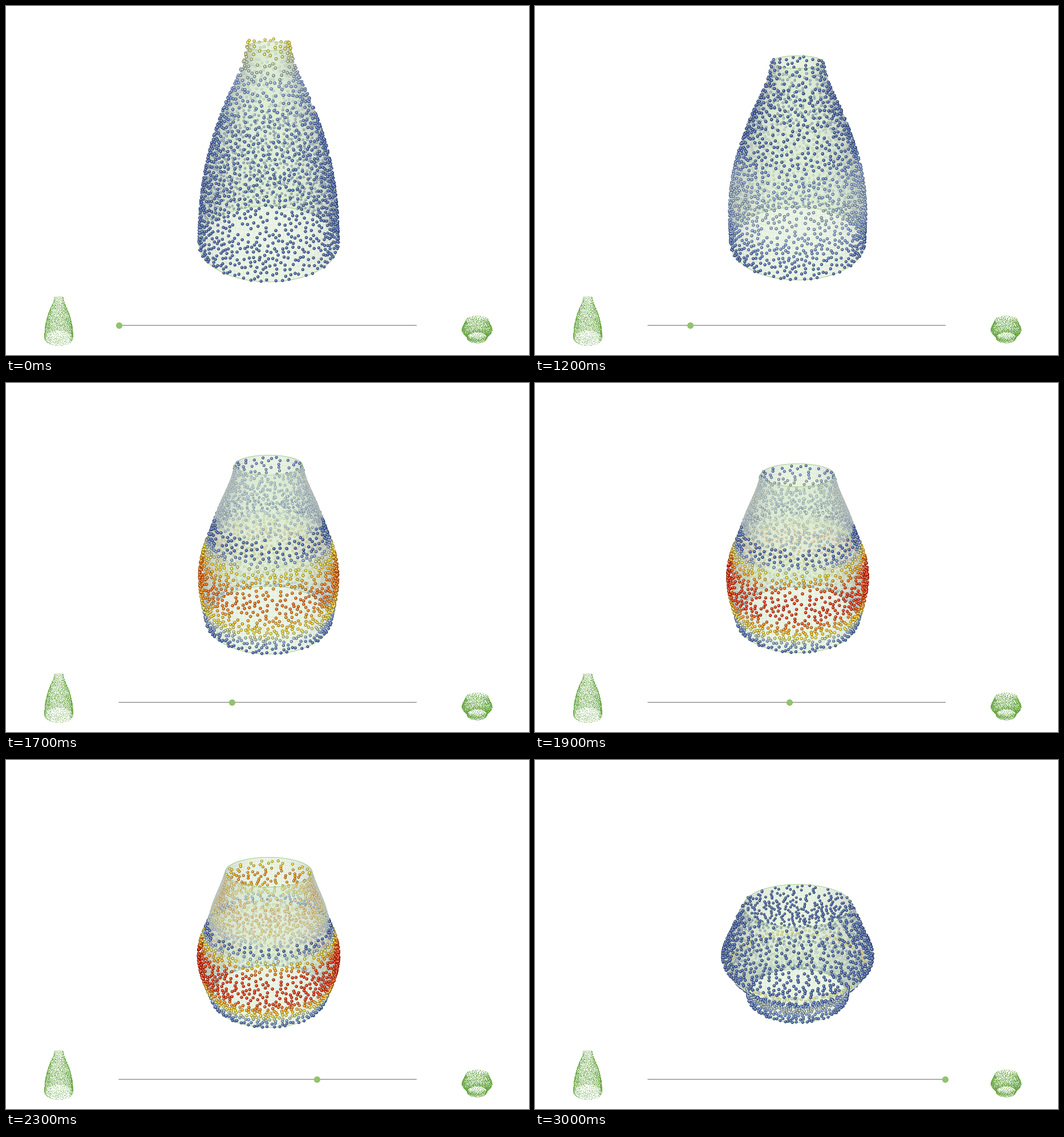
A matplotlib script that plays this animation: 917 px wide and 611 px high, repeating every 4000 ms.

```python
import matplotlib.pyplot as plt
import numpy as np
from matplotlib.animation import FuncAnimation
from matplotlib.collections import PolyCollection

W, H, DPI = 917, 611, 100
STEPS, HOLD, FRAMES = 21, 10, 40
CX, CY, DIST = 460.5, 265, 984
SIN, COS = np.sin(np.radians(24)), np.cos(np.radians(24))
BASE, TALL, SHORT = -168.6, 364.7, 182.6
COUNT = 2100

BOTTLE = ([0, .23, .536, .708, .923, 1], [130, 122.5, 98.5, 75.5, 40, 33])
BOWL = ([0, .12, .25, .36, .46, .6, .8, 1],
        [95, 104, 113, 118.5, 120, 118, 110, 94])

KEYS = np.array([0, 1, 6, 10, 14, 17, 21]) / STEPS
BULGE = [0, .3, 5.2, 8.8, 9.4, 7.8, 0]
SINK = [0, 0, -1.8, -3, -6, -6, 0]
LIFT = [7, 2.5, -2, -1, -4, -5, -.5]

RAMP_X = [0, 1, 2.4, 3.4, 4.3, 5.6, 6.8, 8.4]
RAMP = np.array([[66, 97, 172], [82, 116, 190], [140, 170, 224],
                 [205, 212, 150], [246, 228, 45], [250, 190, 25],
                 [248, 135, 15], [236, 48, 10]]) / 255
LEAF = np.array([215, 233, 204]) / 255
SHADE = np.array([186, 194, 186]) / 255
GREEN = "#92c36d"
LINE_Y = 559.1


def spline(x, knots):
    """Cubic Hermite curve through a few knots."""
    xs, ys = map(np.asarray, knots)
    slope = np.gradient(ys, xs)
    i = np.clip(np.searchsorted(xs, x) - 1, 0, len(xs) - 2)
    h = xs[i + 1] - xs[i]
    u = (x - xs[i]) / h
    return ((1 + 2 * u) * (1 - u) ** 2 * ys[i] + u * (1 - u) ** 2 * h * slope[i]
            + u * u * (3 - 2 * u) * ys[i + 1] + u * u * (u - 1) * h * slope[i + 1])


def bump(s, mid, width):
    return np.exp(-((s - mid) / width) ** 2)


def late(t):
    return np.clip((t - .75) / .25, 0, 1)


def radius(s, t):
    """Blend of both profiles; belly and neck form near the end."""
    blend = (1 - t) * spline(s, BOTTLE) + t * spline(s, BOWL)
    return blend + late(t) * (15 * bump(s, .48, .2) - 14 * bump(s, .16, .12))


def height(t):
    return TALL + (SHORT - TALL) * t


def project(x, y, z):
    scale = DIST / (DIST + y * COS - z * SIN)
    xy = np.stack([CX + x * scale, CY - (z * COS + y * SIN) * scale], -1)
    return xy, scale


def facing(theta, s, t, r, z):
    """Positive where the outside of the wall looks at the camera."""
    lo, hi = np.maximum(s - .004, 0), np.minimum(s + .004, 1)
    slope = (radius(hi, t) - radius(lo, t)) / ((hi - lo) * height(t))
    x, y = r * np.cos(theta), r * np.sin(theta)
    to_cam = -x, -DIST * COS - y, DIST * SIN - z
    return (np.cos(theta) * to_cam[0] + np.sin(theta) * to_cam[1]
            - slope * to_cam[2])


def scatter_points(rng):
    """Best-candidate sampling, even over the area of the tall shape."""
    grid = np.linspace(0, 1, 400)
    cdf = np.cumsum(radius(grid, 0))
    cdf = (cdf - cdf[0]) / (cdf[-1] - cdf[0])
    pts, params = np.zeros((COUNT, 3)), np.zeros((COUNT, 2))
    for i in range(COUNT):
        s = np.interp(rng.random(6), cdf, grid)
        th = rng.random(6) * 2 * np.pi
        r = radius(s, 0)
        cand = np.stack([r * np.cos(th), r * np.sin(th), s * TALL], -1)
        best = 0
        if i:
            gap = ((cand[:, None] - pts[None, :i]) ** 2).sum(-1)
            best = gap.min(1).argmax()
        pts[i], params[i] = cand[best], (s[best], th[best])
    return params.T


def dot_state(t):
    """Screen places, scale, signed gap to the wall and facing of all dots."""
    bulge, sink, lift = (np.interp(t, KEYS, v) for v in (BULGE, SINK, LIFT))
    low = np.sin(np.pi * np.clip(S / .6, 0, 1) ** 1.2)
    high = np.sin(np.pi * .88 * np.clip((S - .6) / .4, 0, 1))
    pinch = 2.6 * bump(S, .15, .09) - 6 * bump(S, .365, .035)
    gap = .4 + bulge * low + sink * high + late(t) * pinch
    rise = lift * S ** 4
    r = radius(S, t) + gap
    z = BASE + S * height(t) + rise
    xy, scale = project(r * np.cos(TH), r * np.sin(TH), z)
    return xy, scale, gap + .55 * rise, facing(TH, S, t, r, z) > 0


def wall_state(t):
    """Quads of the wall with their colours, and which face the camera."""
    s, th = np.meshgrid(np.linspace(0, 1, 33), np.linspace(0, 2 * np.pi, 97),
                        indexing="ij")
    r = radius(s, t)
    xy, _ = project(r * np.cos(th), r * np.sin(th), BASE + s * height(t))
    quads = np.stack([xy[:-1, :-1], xy[1:, :-1], xy[1:, 1:], xy[:-1, 1:]], 2)
    ms = (s[:-1, :-1] + s[1:, 1:]) / 2
    mt = (th[:-1, :-1] + th[1:, 1:]) / 2
    mr = radius(ms, t)
    front = facing(mt, ms, t, mr, BASE + ms * height(t)) > 0
    k = np.abs(np.cos(mt))[..., None] ** 3
    rgb = LEAF * (1 - k) + SHADE * k
    rgba = np.concatenate([rgb, np.full(k.shape, .48)], -1)
    return quads.reshape(-1, 4, 2), rgba.reshape(-1, 4), front.ravel()


def ring(s, t):
    th = np.linspace(0, 2 * np.pi, 121)
    r = radius(np.array(s), t)
    return project(r * np.cos(th), r * np.sin(th), BASE + s * height(t))[0].T


S, TH = scatter_points(np.random.default_rng(8))

fig = plt.figure(figsize=(W / DPI, H / DPI), dpi=DPI, facecolor="white")
ax = fig.add_axes([0, 0, 1, 1])
ax.set(xlim=(0, W), ylim=(H, 0))
ax.axis("off")


def dot_layer(order):
    body = ax.scatter([], [], marker="o", linewidths=.55, zorder=order)
    shine = ax.scatter([], [], marker="o", linewidths=0, zorder=order + .1)
    return body, shine


def wall_layer(order):
    return ax.add_collection(PolyCollection([], antialiased=False,
                                            linewidths=0, zorder=order),
                             autolim=False)


def fill_dots(layer, mask, xy, scale, gap):
    body, shine = layer
    idx = np.flatnonzero(mask)
    idx = idx[np.argsort(scale[idx])]
    rgb = np.stack([np.interp(np.abs(gap[idx]), RAMP_X, c) for c in RAMP.T], -1)
    size = (4.3 * scale[idx] * .72) ** 2
    body.set_offsets(xy[idx])
    body.set_sizes(size)
    body.set_facecolor(rgb)
    body.set_edgecolor(rgb * .5)
    shine.set_offsets(xy[idx] + [-.5, -.6])
    shine.set_sizes(size * .2)
    shine.set_facecolor(rgb * .5 + .5)


behind, between, ahead = dot_layer(1), dot_layer(3), dot_layer(5)
back_wall, front_wall = wall_layer(2), wall_layer(4)
rims = [ax.plot([], [], color="#9cc684", lw=.6, zorder=4.5)[0] for _ in range(2)]

ax.plot([198, 719.5], [LINE_Y, LINE_Y], color="#707070", lw=.8, snap=False)
knob, = ax.plot([], [], "o", color=GREEN, ms=11.2 * .72, mew=0, zorder=6)

# thumbnails of both end shapes
for t, x0, y0, foot, k in ((0, 92, 594.5, 483, .203), (1, 825.5, 590, 461, .2)):
    p = dot_state(t)[0]
    ax.scatter(x0 + (p[:, 0] - CX) * k, y0 + (p[:, 1] - foot) * k,
               s=.36, color="#66a540", linewidths=0)


def update(frame):
    t = np.clip(frame - HOLD + 1, 0, STEPS) / STEPS
    quads, rgba, front = wall_state(t)
    for wall, mask in ((back_wall, ~front), (front_wall, front)):
        wall.set_verts(quads[mask])
        wall.set_facecolor(rgba[mask])
    xy, scale, gap, near = dot_state(t)
    # dots close to the wall poke through it and show on both sides
    hidden = ~near & (gap > 1)
    clear = near & (gap > -1)
    fill_dots(behind, hidden, xy, scale, gap)
    fill_dots(between, ~hidden & ~clear, xy, scale, gap)
    fill_dots(ahead, clear, xy, scale, gap)
    for line, s in zip(rims, (0., 1.)):
        line.set_data(*ring(s, t))
    knob.set_data([197.5 + 521.9 * t], [LINE_Y])
    return []


anim = FuncAnimation(fig, update, frames=FRAMES, interval=100, repeat=True,
                     repeat_delay=0, init_func=lambda: update(0), blit=False)
plt.show()
```
